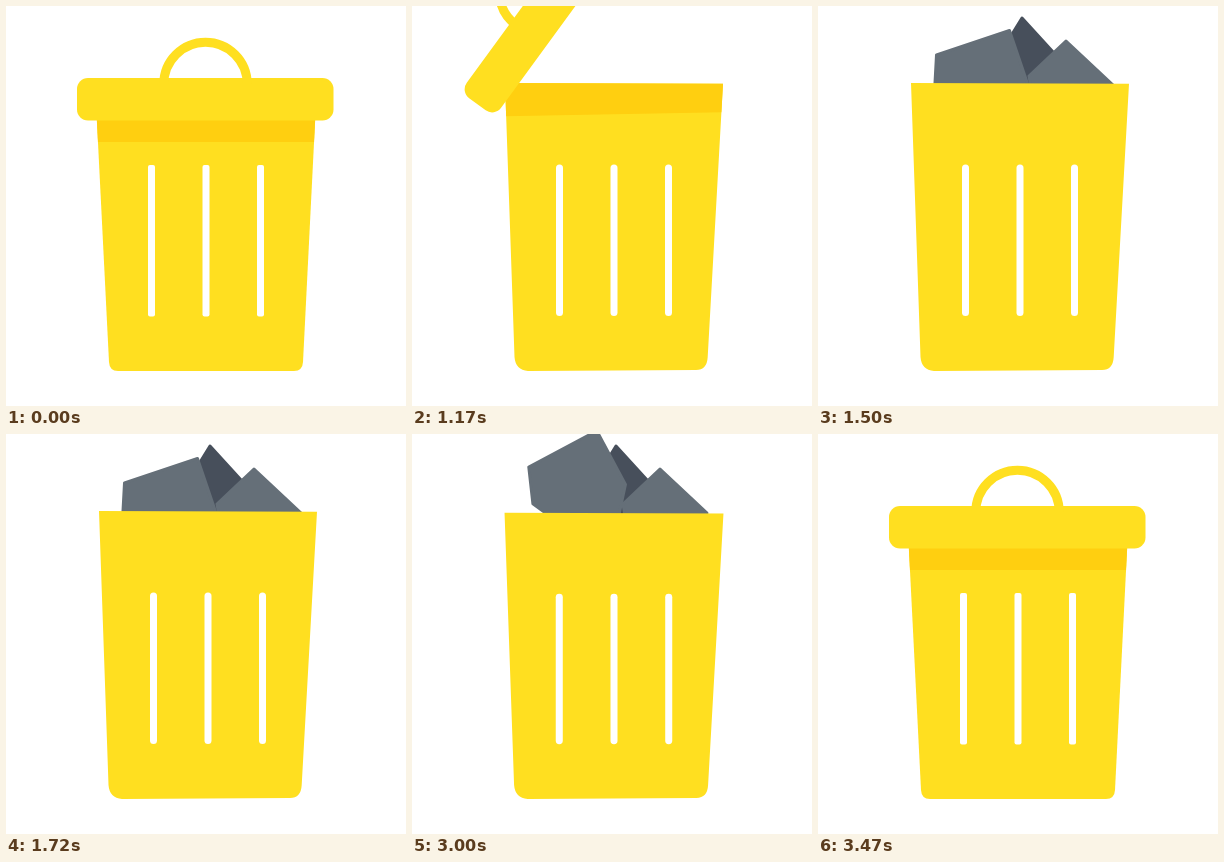
Animation, 400 px wide and 400 px high, one loop 3.5 s. Source, as an HTML page:

```html
<!DOCTYPE html>
<html lang="en">
<head>
<meta charset="utf-8">
<title>Bin</title>
<style>
  html, body { margin: 0; width: 100%; height: 100%; overflow: hidden; background: #fff; }
  svg { display: block; width: 100%; height: 100%; }
  .yellow { fill: #ffdf20; }
  .shade { fill: #ffcf10; }
  .slits { fill: #fff; }
  .rock { stroke-width: 3; stroke-linejoin: round; }
  .dark { fill: #474f5b; stroke: #474f5b; }
  .light { fill: #656f78; stroke: #656f78; }
</style>
</head>
<body>
<svg viewBox="0 0 400 400">
  <defs>
    <clipPath id="bodyClip"><path id="clipShape"/></clipPath>
  </defs>
  <g id="rocks">
    <polygon id="buried" class="rock dark" points="152,-20 187,23 205,28 243,17 256,-10 240,-48 175,-48"/>
    <polygon id="peak" class="rock dark" points="204,12 267,81 232,110 143,111"/>
    <polygon id="left" class="rock light" points="116.5,86 118.5,49 191.5,24.5 211,82 200,110 140,110"/>
    <polygon id="right" class="rock light" points="211,70 248,35 295,79 267,123 216,100"/>
  </g>
  <g id="bin">
    <path id="body" class="yellow"/>
    <polygon id="shade" class="shade" clip-path="url(#bodyClip)"/>
    <g id="slits" class="slits">
      <rect x="142" y="159" width="7" height="151.5"/>
      <rect x="196.5" y="159" width="7" height="151.5"/>
      <rect x="251" y="159" width="7" height="151.5"/>
    </g>
  </g>
  <g id="lid">
    <rect class="yellow" x="71" y="72" width="256.5" height="42.5" rx="11"/>
    <path d="M157.8 78a41.7 41.7 0 0 1 83.4 0" fill="none" stroke="#ffdf20" stroke-width="9"/>
  </g>
</svg>
<script>
const LOOP = 3500, STEP = 25, LAST = 29, OPEN_AT = 1020, CLOSE_AT = 2770;
const CLOSED_BODY = 'M89 77H311L297 356Q296.5 365 288 365H112Q103.5 365 103 356Z';
const OPEN_BODY = 'M93 77L311 77.7L295.7 351Q295 364 284 364L116 365Q103.500 364 102.500 351Z';
const $ = id => document.getElementById(id);

// Smooth curve through [step, value] points that never overshoots them.
function track(...points) {
  const slope = i => (points[i + 1][1] - points[i][1]) / (points[i + 1][0] - points[i][0]);
  const tangents = points.map((_, i) => {
    if (i === 0 || i === points.length - 1) return 0;
    const a = slope(i - 1), b = slope(i);
    return a * b <= 0 ? 0 : 2 * a * b / (a + b);
  });
  return s => {
    if (s <= points[0][0]) return points[0][1];
    const i = points.findIndex(p => p[0] >= s) - 1;
    if (i < 0) return points[points.length - 1][1];
    const [s0, v0] = points[i], [s1, v1] = points[i + 1];
    const d = s1 - s0, u = (s - s0) / d, w = 1 - u;
    return v0 * w * w * (1 + 2 * u) + v1 * u * u * (3 - 2 * u)
      + d * u * w * (tangents[i] * w - tangents[i + 1] * u);
  };
}

const still = () => 0;
const rocks = [
  { id: 'buried', pivot: '205 0', x: still, turn: still,
    y: track([6, -260], [10, 0], [12, 135]) },
  { id: 'peak', pivot: '204 70', x: still, turn: still,
    y: track([6, -260], [8, -90], [10, -16], [13, 16], [17, 0]) },
  { id: 'left', pivot: '165 70',
    x: track([13, 20], [20, 0]),
    y: track([13, -300], [17, -110], [20, 0], [22, 12], [26, 0]),
    turn: track([13, -160], [17, -55], [20, 0]) },
  { id: 'right', pivot: '250 75',
    x: track([9, 20], [13, 11.5], [16, 0]),
    y: track([9, -290], [13, -71.5], [16, 14], [19, 0]),
    turn: track([9, 250], [13, 125], [16, 0]) }
];
const squash = track([10, 0], [13, 1], [16, 0], [17.5, .6], [20, 0],
  [22, 1], [25, 0], [27, -.2], [28, -.14], [29, 0]);

// The bin opens and fills in fixed steps, then plays the same steps backwards.
function stepAt(t) {
  if (t < OPEN_AT) return 0;
  if (t < CLOSE_AT) return Math.min(LAST, Math.floor((t - OPEN_AT) / STEP) + 1);
  return Math.max(0, LAST - 1 - Math.floor((t - CLOSE_AT) / STEP));
}

function draw(s) {
  const open = s > 0, u = s / 10;

  for (const { id, pivot, x, y, turn } of rocks)
    $(id).setAttribute('transform', `translate(${x(s)} ${y(s)}) rotate(${turn(s)} ${pivot})`);

  const shape = open ? OPEN_BODY : CLOSED_BODY;
  $('body').setAttribute('d', shape);
  $('clipShape').setAttribute('d', shape);
  $('slits').setAttribute('transform', open ? 'translate(2 -.5)' : '');
  for (const slit of $('slits').children) slit.setAttribute('rx', open ? 3.5 : 2);

  const shadeLeft = 136 - 52 * u * u;
  const shadeRight = shadeLeft - (open ? 3 + 2 * u : 0);
  $('shade').setAttribute('points', `85,0 315,0 315,${shadeRight} 85,${shadeLeft}`);

  const q = squash(s);
  $('bin').setAttribute('transform',
    `translate(202 365) scale(${1 + .02 * q} ${1 - .028 * q}) translate(-202 -365)`);

  const lidX = (open ? 1.5 : 0) - 190 * u ** 3.25;
  const lidY = -163 * u ** 1.4;
  const lidTurn = -92 * u ** 1.5;
  $('lid').setAttribute('transform', `translate(${lidX} ${lidY}) rotate(${lidTurn} 199.5 93.5)`);
}

const start = performance.now();
function tick() {
  draw(stepAt((performance.now() - start) % LOOP));
  requestAnimationFrame(tick);
}
tick();
</script>
</body>
</html>
```
